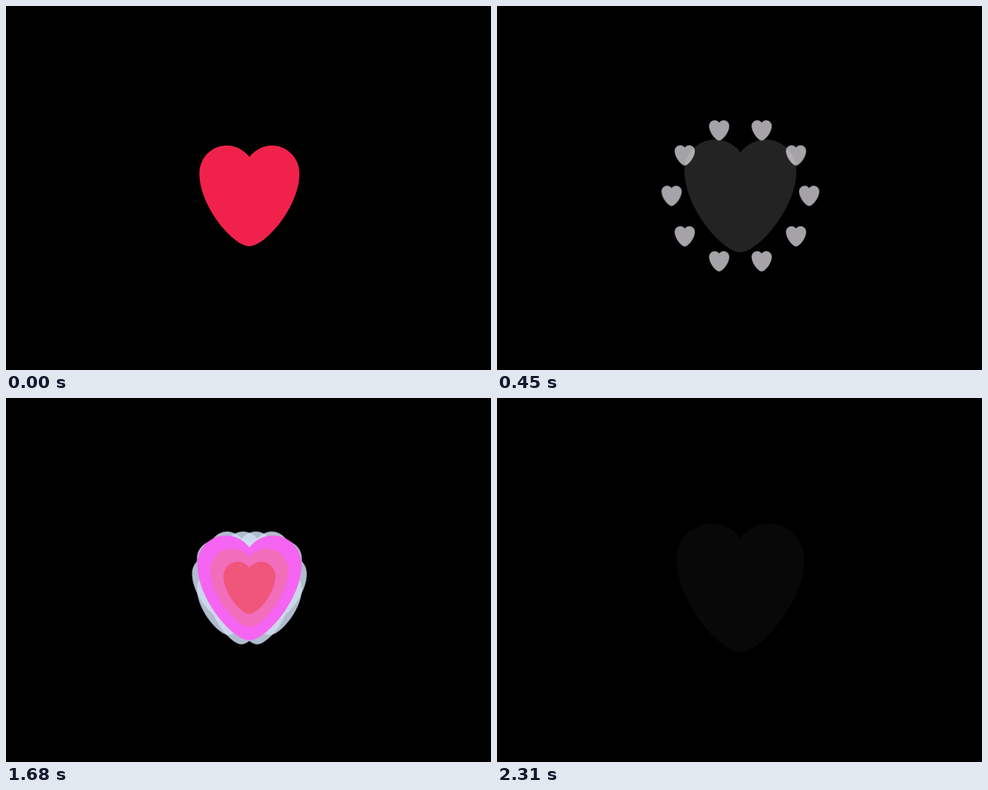
Write an HTML page without scripts that moves like this. It is 800 px wide and 600 px high and loops after 2.73 s.

```html
<!DOCTYPE html>
<html lang="en">
<head>
<meta charset="utf-8">
<title>Heart burst</title>
<style>
html, body { margin: 0; width: 100%; height: 100%; overflow: hidden; background: #000; }
svg { display: block; width: 100%; height: 100%; }

/* When each layer is on stage */
.rest, .one, .two, .echo { animation: 2730ms step-end infinite both; }
.rest { animation-name: show-rest; }
.one  { animation-name: show-one;  --start: 42ms; }
.two  { animation-name: show-two;  --start: 1530ms; }
.echo { animation-name: show-echo; --start: 1633ms; }

@keyframes show-rest { 0% { visibility: visible; } 2.19%, 100% { visibility: hidden; } }
@keyframes show-one  { 0%, 56.04% { visibility: hidden; } 2.19% { visibility: visible; } 100% { visibility: hidden; } }
@keyframes show-two  { 0% { visibility: hidden; } 56.04%, 100% { visibility: visible; } }
@keyframes show-echo { 0%, 84.6% { visibility: hidden; } 59.8% { visibility: visible; } 100% { visibility: hidden; } }

.rest { fill: rgb(240,34,75); }
.base, .ripple, .ring use { animation: 2730ms linear var(--start) infinite both; }
.base { animation-name: base; }
.ripple { animation-name: ripple; }
.ring use { animation-name: fly; --a: calc(var(--i) * 36deg); }

.ring :nth-child(1) { --i: 0; }
.ring :nth-child(2) { --i: 1; }
.ring :nth-child(3) { --i: 2; }
.ring :nth-child(4) { --i: 3; }
.ring :nth-child(5) { --i: 4; }
.ring :nth-child(6) { --i: 5; }
.ring :nth-child(7) { --i: 6; }
.ring :nth-child(8) { --i: 7; }
.ring :nth-child(9) { --i: 8; }
.ring :nth-child(10) { --i: 9; }

@keyframes base {
  0%    { fill: rgb(240,45,92); transform: scale(1); opacity: 1; }
  5.5%  { fill: rgb(246,99,241); transform: scale(1.042); opacity: 1; }
  8%, 100% { fill: rgb(246,99,241); transform: scale(1.05); opacity: 0; }
}

@keyframes ripple {
  0%     { transform: scale(.358); fill: rgb(240,32,70); opacity: .8; }
  1.72%  { transform: scale(.515); fill: rgb(240,75,95); opacity: .7; }
  5.49%  { transform: scale(.776); fill: rgb(238,115,138); opacity: .55; }
  8.35%  { transform: scale(.927); fill: rgb(238,186,188); opacity: .4; }
  10.51% { transform: scale(.994); fill: rgb(250,192,194); opacity: .35; }
  14.29% { transform: scale(1.109); fill: #fafafa; opacity: .15; }
  18.68% { transform: scale(1.18); fill: #fafafa; opacity: .085; }
  25.93% { transform: scale(1.267); fill: #fafafa; opacity: .032; }
  28.57%, 100% { transform: scale(1.279); fill: #fafafa; opacity: .032; }
}

@keyframes fly {
  0%     { transform: rotate(var(--a)) translateX(3px) rotate(calc(-1 * var(--a))) scale(.957); fill: rgb(206,221,240); opacity: .86; }
  1.72%  { transform: rotate(var(--a)) translateX(14px) rotate(calc(-1 * var(--a))) scale(.86); }
  5.49%  { transform: rotate(var(--a)) translateX(42px) rotate(calc(-1 * var(--a))) scale(.636); fill: rgb(206,221,240); opacity: .86; }
  8.35%  { transform: rotate(var(--a)) translateX(66px) rotate(calc(-1 * var(--a))) scale(.461); fill: rgb(250,255,255); opacity: .79; }
  10.51% { transform: rotate(var(--a)) translateX(81.5px) rotate(calc(-1 * var(--a))) scale(.364); fill: rgb(240,251,255); opacity: .75; }
  14.29% { transform: rotate(var(--a)) translateX(108.5px) rotate(calc(-1 * var(--a))) scale(.218); fill: rgb(250,247,255); opacity: .68; }
  18.68% { transform: rotate(var(--a)) translateX(140px) rotate(calc(-1 * var(--a))) scale(.115); opacity: .57; }
  24.84% { transform: rotate(var(--a)) translateX(187px) rotate(calc(-1 * var(--a))) scale(.048); opacity: .4; }
  25.5%, 100% { transform: rotate(var(--a)) translateX(190px) rotate(calc(-1 * var(--a))) scale(0); fill: rgb(250,247,255); opacity: 0; }
}
</style>
</head>
<body>
<svg viewBox="0 0 800 600">
  <defs>
    <path id="h" d="M0-64C8-75 22-83 37-83C62-83 82.5-63 82.5-37C82.5 18 26 83 0 83C-26 83-82.5 18-82.5-37C-82.5-63-62-83-37-83C-22-83-8-75 0-64Z"/>
  </defs>
  <g transform="translate(401.5 313)">
    <g class="one"><g class="ring">
      <use href="#h"/><use href="#h"/><use href="#h"/><use href="#h"/><use href="#h"/>
      <use href="#h"/><use href="#h"/><use href="#h"/><use href="#h"/><use href="#h"/>
    </g></g>
    <g class="echo"><g class="ring">
      <use href="#h"/><use href="#h"/><use href="#h"/><use href="#h"/><use href="#h"/>
      <use href="#h"/><use href="#h"/><use href="#h"/><use href="#h"/><use href="#h"/>
    </g></g>
    <g class="two"><g class="ring">
      <use href="#h"/><use href="#h"/><use href="#h"/><use href="#h"/><use href="#h"/>
      <use href="#h"/><use href="#h"/><use href="#h"/><use href="#h"/><use href="#h"/>
    </g></g>
    <g class="rest"><use href="#h"/></g>
    <g class="one"><use class="base" href="#h"/><use class="ripple" href="#h"/></g>
    <g class="two"><use class="base" href="#h"/><use class="ripple" href="#h"/></g>
    <g class="echo"><use class="ripple" href="#h"/></g>
  </g>
</svg>
</body>
</html>
```
